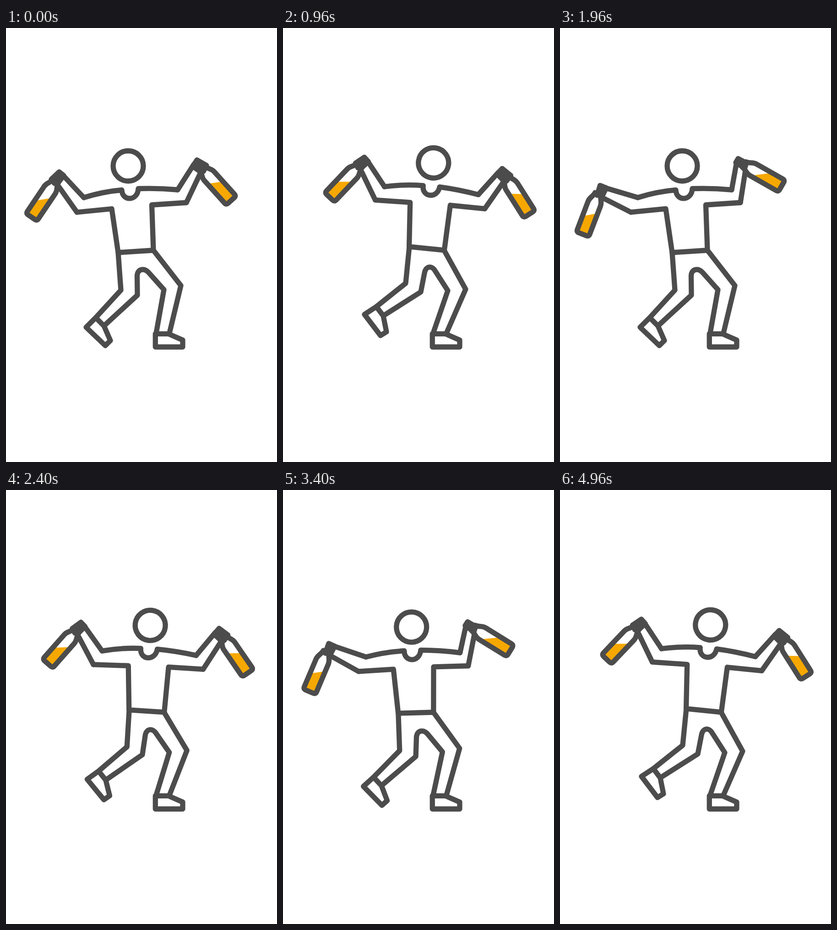
These frames come from a looping animation (592 by 947 pixels, 5 s). An HTML page:

```html
<!DOCTYPE html>
<html lang="en">
<head>
<meta charset="utf-8">
<title>Dancing with bottles</title>
<style>
  html, body { margin: 0; width: 100%; height: 100%; overflow: hidden; background: #fff; }
  svg { display: block; width: 100%; height: 100%; }
  .line { fill: none; stroke: #4c4c4c; stroke-width: 11.3; stroke-linejoin: round; stroke-linecap: round; }
  .fist { fill: #4c4c4c; }
  .glass { fill: #fff; stroke: none; }
  .liquid { fill: #f6a800; stroke: none; }
</style>
</head>
<body>
<svg viewBox="0 0 592 947">
  <g class="line">
    <path id="legs"/>
    <path d="M326.3 667.3L355 667.3L386 681V696H326.3Z"/>
    <g id="torso">
      <circle cx="267" cy="301" r="33"/>
      <path d="M170 370Q212 357 253 353.5C254 379.5 288 377.5 289 350.5Q332 349 375 353"/>
      <path d="M155 402L231 394.5L245 490L322 485L318.5 386L394 381"/>
      <g id="armsOut"></g>
      <g id="armsSwung"></g>
    </g>
  </g>
</svg>
<script>
const $ = id => document.getElementById(id);
const LOOP = 5000, BEAT = 1000, STEP = 40;

// Both leg poses share one structure, so their numbers can be blended.
const legsLeft = 'M245 490L251 572L196 632M214 650L287 583L286.5 541C287 525 302 523 312 534L345 571L328 666' +
  'M322 485L382 562L357 666M175 653L196 632L214 650L228 682L217 693Z';
const legsRight = 'M276 477L268 557L204 608M219 628L301 576L309 535C312 518 326 518 333 531L360 573L328 666' +
  'M352 485L399 570L357 666M178 625L204 608L219 628L226 663L213 671Z';

function blend(from, to, k) {
  const ends = to.match(/[\d.]+/g);
  let i = 0;
  return from.replace(/[\d.]+/g, n => (+n + (ends[i++] - n) * k).toFixed(2));
}

// Bottle hangs along +y from its neck; the liquid surface runs from yl to yr.
function bottle(x, y, angle, yl, yr) {
  const shape = 'M-7 -8C-8 2 -14.5 5 -14.5 15V81Q-14.5 86.5 -9 86.5H9Q14.5 86.5 14.5 81V15C14.5 5 8 2 7 -8';
  return `<g transform="translate(${x} ${y}) rotate(${angle})">
    <path class="glass" d="${shape}"/>
    <path class="liquid" d="M-14.5 ${yl}L14.5 ${yr}V82H-14.5Z"/>
    <path d="${shape}"/></g>`;
}

const arm = (forearm, fist, ...flask) =>
  `<path d="${forearm}"/>${bottle(...flask)}<path class="fist" d="${fist}Z"/>`;

$('armsOut').innerHTML =
  arm('M170 370L127 324M155 402L116 347', 'M116 314L126 322L112 340L106 339L99 330', 104, 341, 34, 53.5, 25.9) +
  arm('M375 353L410 298M394 381L424 318', 'M417 288L438 300L431 313L425 314L408 302', 434, 312, -42, 24.5, 44);
$('armsSwung').innerHTML =
  arm('M170 370L96 348M155 402L96 372', 'M87.5 343.6L101 349L92.6 366L81 365', 80.3, 369.2, 20.9, 49.8, 32) +
  arm('M375 353L386 292M394 381L405 311', 'M389 285L407 294.6L403.5 306L384 293.5', 409, 302, -60.4, 15.9, 54);

// cubic-bezier(.33, 0, 0, 1), solved by bisection
function ease(p) {
  let lo = 0, hi = 1, s;
  for (let i = 0; i < 24; i++) {
    s = (lo + hi) / 2;
    if (0.99 * s * (1 - s) ** 2 + s ** 3 < p) lo = s; else hi = s;
  }
  return s * s * (3 - 2 * s);
}

function draw(time) {
  const t = Math.floor(time % LOOP / STEP) * STEP;
  const back = Math.floor(t / BEAT) % 2 === 1;
  const progress = ease(t % BEAT / BEAT);
  const k = back ? 1 - progress : progress;

  $('legs').setAttribute('d', blend(legsLeft, legsRight, k));
  $('torso').setAttribute('transform',
    `translate(${30.5 * k} ${-6.5 * k}) rotate(${9.6 * k} 283.5 487.5)`);
  $('armsOut').style.display = back ? 'none' : '';
  $('armsSwung').style.display = back ? '' : 'none';
}

const start = performance.now();
function tick() {
  draw(performance.now() - start);
  requestAnimationFrame(tick);
}
tick();
</script>
</body>
</html>
```
